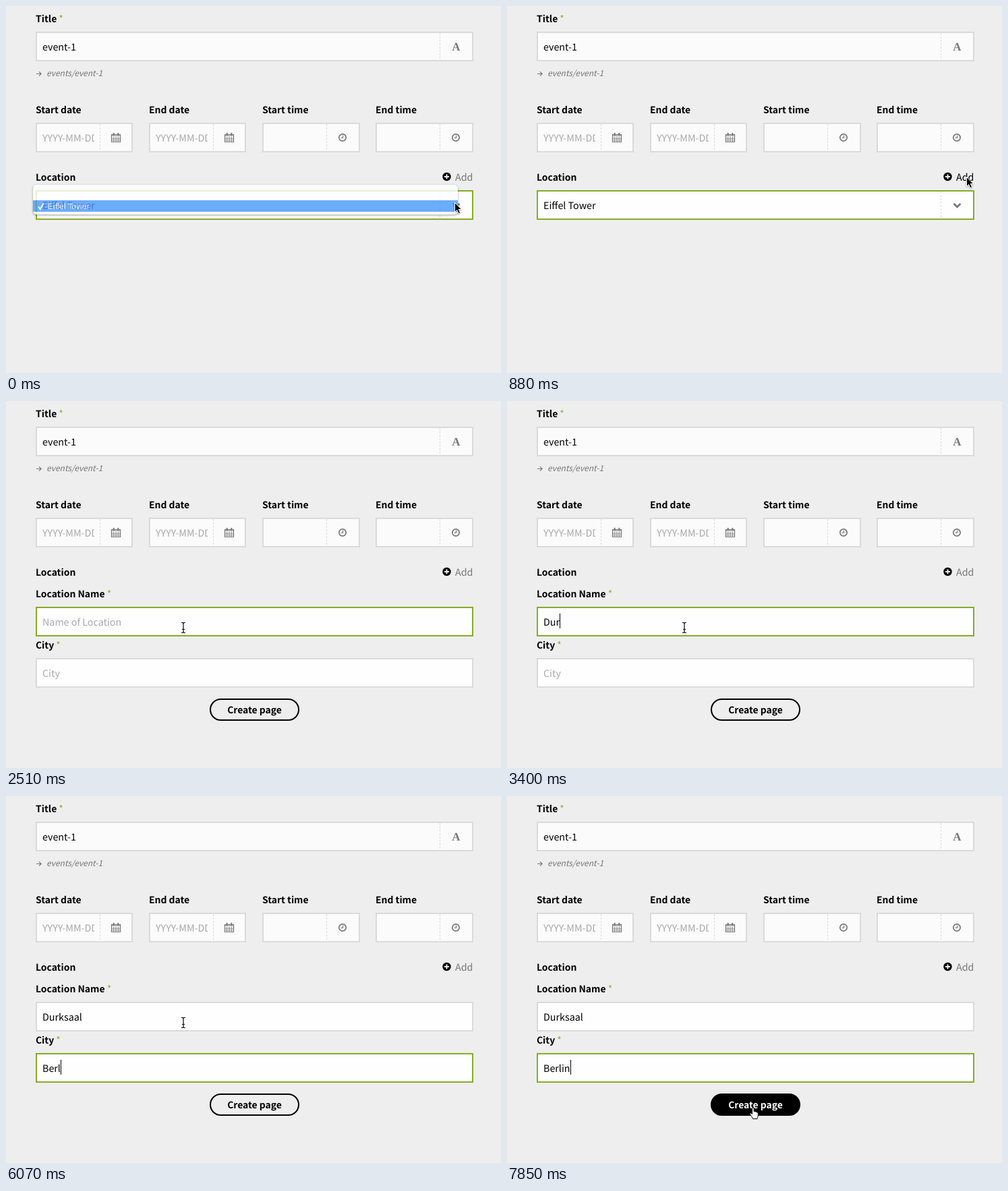
Write an HTML page that moves like this. It is 734x544 px and loops after 8000 ms.

```html
<!DOCTYPE html>
<html lang="en">
<head>
<meta charset="utf-8">
<title>Event form</title>
<style>
  html, body { margin: 0; width: 100%; height: 100%; overflow: hidden; background: #eee; }
  svg { display: block; }
  text {
    font: 14.3px "Noto Sans CJK JP", "Noto Sans CJK SC", "Noto Sans CJK KR", "Noto Sans CJK TC", "Noto Sans CJK", "Noto Sans", sans-serif;
    text-rendering: geometricPrecision;
  }
  .label { font-size: 13.9px; font-weight: 600; }
  .star { fill: #8dae28; font-weight: 400; }
  .hint { fill: #a9a9a9; }
  .soft { fill: #777; }
  .slug { font-size: 12px; font-style: italic; fill: #777; }
  .serif { font: bold 17px "Liberation Serif", serif; fill: #777; }
  .menu { font: 12px "Liberation Sans", Arial, sans-serif; fill: #fff; }
  .box { stroke: #dadada; stroke-width: 2; fill: #fefefe; }
  .pale { fill: #fbfbfb; }
  .focus { stroke: #87ab28; }
  .split { stroke: #dadada; stroke-dasharray: 3 2; }
  .line { fill: none; stroke: #777; }
</style>
</head>
<body>
<svg id="stage" width="734" height="544" viewBox="0 0 734 544"></svg>
<script>
const LOOP = 8000;
const $ = id => document.getElementById(id);

const text = (x, y, str, cls = "", extra = "") =>
  `<text x="${x}" y="${y}" class="${cls}" ${extra}>${str}</text>`;
const label = (x, y, str, required) =>
  text(x, y, str + (required ? ' <tspan class="star">*</tspan>' : ""), "label");
const box = (x, y, w, cls = "", id = "") =>
  `<rect id="${id}" class="box ${cls}" x="${x + 1}" y="${y + 1}" width="${w - 2}" height="42"/>`;
const split = (x, y) => `<path class="split" d="M${x}.5 ${y + 2}v40"/>`;

const calendar = x => `<g class="line" transform="translate(${x} 188)">
  <path d="M.5 2.5h13v11h-13zM.5 4h13" stroke-width="1.2"/>
  <path d="M3.7 5.5v8M7 5.5v8M10.3 5.5v8M1 8.2h12M1 10.9h12" stroke-width=".8"/>
  <path d="M3.7 0v4M10.3 0v4" stroke-width="2"/></g>`;
const clock = x => `<g class="line" transform="translate(${x} 195)">
  <circle r="5.2" stroke-width="1.7"/><path d="M.5 -3.2v3.7h-2.9" stroke-width="1.2"/></g>`;

const dateField = (x, name) => label(x, 159, name) + box(x, 173, 144, "pale") +
  `<svg x="${x + 10}" y="175" width="77" height="40">${text(0, 26, "YYYY-MM-DD", "hint")}</svg>` +
  split(x + 95, 173) + calendar(x + 112);
const timeField = (x, name) => label(x, 159, name) + box(x, 173, 145, "pale") +
  split(x + 95, 173) + clock(x + 119);

const entry = (id, y, name, hint) => label(44, y - 14, name, true) + box(44, y, 649, "", id + "Box") +
  text(54, y + 28, hint, "hint", `id="${id}Hint"`) + text(54, y + 28, "", "", `id="${id}Text"`) +
  `<rect id="${id}Caret" x="54" y="${y + 10}" width="1" height="22"/>`;

$("stage").innerHTML = `
  <rect width="734" height="544" fill="#eee"/>
  ${label(44, 24, "Title", true)}
  ${box(44, 38, 649, "pale")}${split(643, 38)}
  ${text(54, 66, "event-1")}${text(661.3, 66, "A", "serif")}
  <path class="line" d="M45 100.5h7M49 97.3l3.2 3.2l-3.2 3.2" stroke-width="1.2"/>
  ${text(60, 104, "events/event-1", "slug")}
  ${dateField(44, "Start date")}${dateField(212, "End date")}
  ${timeField(380, "Start time")}${timeField(548, "End time")}
  ${label(44, 259, "Location")}
  <circle cx="653.5" cy="253" r="6.2"/>
  <path d="M653.5 249.4v7.2M649.9 253h7.2" stroke="#eee" stroke-width="2"/>
  ${text(666, 259, "Add", "soft", 'id="add"')}
  <g id="picker">
    ${box(44, 273, 649, "focus")}${split(643, 273)}
    ${text(54, 301, "Eiffel Tower")}
    <path class="line" d="M662.5 293l5 4.8l5 -4.8" stroke-width="2.8"/>
  </g>
  <g id="menu" opacity=".8">
    <rect x="40" y="265" width="630" height="44" rx="5" fill="#fff"
      style="filter:drop-shadow(0 1px 1.5px rgba(0,0,0,.5))"/>
    <rect x="40" y="288" width="630" height="17" fill="#4798fc"/>
    <path d="M48 297.5l2.7 3.7l5.3 -9" fill="none" stroke="#fff" stroke-width="2"/>
    ${text(62, 301, "Eiffel Tower", "menu")}
  </g>
  <g id="form">
    ${entry("name", 305, "Location Name", "Name of Location")}
    ${entry("city", 381, "City", "City")}
    <rect id="button" x="303" y="442" width="131" height="31" rx="15.5" stroke="#000" stroke-width="2"/>
    ${text(368.5, 463, "Create page", "label", 'id="buttonText" text-anchor="middle"')}
  </g>
  <g id="cursor">
    <path id="arrow" d="M.5 .5v14l3.2 -3l2.3 5.2l2.6 -1.1l-2.3 -5.1h4.4z" stroke="#fff"
      style="filter:drop-shadow(0 1px 1px rgba(0,0,0,.35))"/>
    <g id="beam" fill="none">
      <path d="M-3 -7.5h2l1 1l1 -1h2M0 -6.5v13M-3 7.5h2l1 -1l1 1h2M-2 2.5h4" stroke="#fff" stroke-width="2.6" opacity=".8"/>
      <path d="M-3 -7.5h2l1 1l1 -1h2M0 -6.5v13M-3 7.5h2l1 -1l1 1h2M-2 2.5h4" stroke="#000" stroke-width="1.2"/>
    </g>
    <path id="hand" fill="#fff" stroke="#000" stroke-linejoin="round"
      d="M-2.5 -1.5q0 -1.6 1.3 -1.6t1.3 1.6v4q1.8 -.6 2.2 .6q1.7 -.4 2 .7q2 -.2 2 1.6v3q0 2 -1.2 3.4v1.7h-6.4q-.6 -2 -2.1 -3.6l-2.2 -3.2q-.5 -1.4 .8 -1.7q1.2 0 2.3 1.5z"/>
  </g>`;

// Tables of steps: the last row whose time has passed is in force.
const pointer = [
  [0, 665, 291, "arrow"], [290, 665, 289, "arrow"], [440, 667, 281, "arrow"],
  [590, 672, 268, "arrow"], [740, 678, 258, "arrow"], [880, 681, 253, "arrow"],
  [1470, 668, 258, "arrow"], [1620, 560, 290, "arrow"], [1760, 400, 318, "beam"],
  [1910, 290, 333, "beam"], [2060, 263, 336, "beam"],
  [7120, 268, 340, "beam"], [7270, 285, 362, "arrow"], [7410, 318, 400, "beam"],
  [7560, 348, 437, "arrow"], [7700, 362, 461, "hand"], [7850, 366, 465, "hand"]
];
const fields = [
  { id: "name", value: "Durksaal", keys: [2960, 3260, 3400, 3700, 4000, 4140, 4290, 4590],
    from: 2060, to: 5040, blinks: [[2510, 2960]] },
  { id: "city", value: "Berlin", keys: [5640, 5780, 5930, 6070, 6370, 6520],
    from: 5040, to: LOOP, blinks: [[5490, 5640], [7120, 7560]] }
];

const within = (t, a, b) => t >= a && t < b;
const show = (id, on) => $(id).setAttribute("visibility", on ? "visible" : "hidden");

function drawField(f, t, open) {
  const typed = f.value.slice(0, f.keys.filter(k => k <= t).length);
  const node = $(f.id + "Text");
  const active = within(t, f.from, f.to);
  if (node.textContent !== typed) node.textContent = typed;
  const end = typed ? node.getComputedTextLength() : 0;
  $(f.id + "Caret").setAttribute("x", Math.round(54 + end));
  $(f.id + "Box").classList.toggle("focus", active);
  show(f.id + "Hint", open && !typed);
  show(f.id + "Caret", active && !f.blinks.some(b => within(t, ...b)));
}

function draw(t) {
  const open = t >= 1180;
  show("menu", t < 150);
  show("picker", !open);
  show("form", open);
  fields.forEach(f => drawField(f, t, open));

  const [, x, y, kind] = pointer.filter(p => p[0] <= t).pop();
  $("cursor").setAttribute("transform", `translate(${x} ${y})`);
  ["arrow", "beam", "hand"].forEach(k => show(k, k === kind));

  const overAdd = x >= 647 && x <= 693 && y >= 244 && y <= 264 && t < 1470;
  $("add").style.fill = overAdd ? "#000" : "#777";
  const overButton = kind === "hand";
  $("button").style.fill = overButton ? "#000" : "#eee";
  $("buttonText").style.fill = overButton ? "#fff" : "#000";
}

const start = performance.now();
function tick() {
  draw((performance.now() - start) % LOOP);
  requestAnimationFrame(tick);
}
tick();
</script>
</body>
</html>
```
